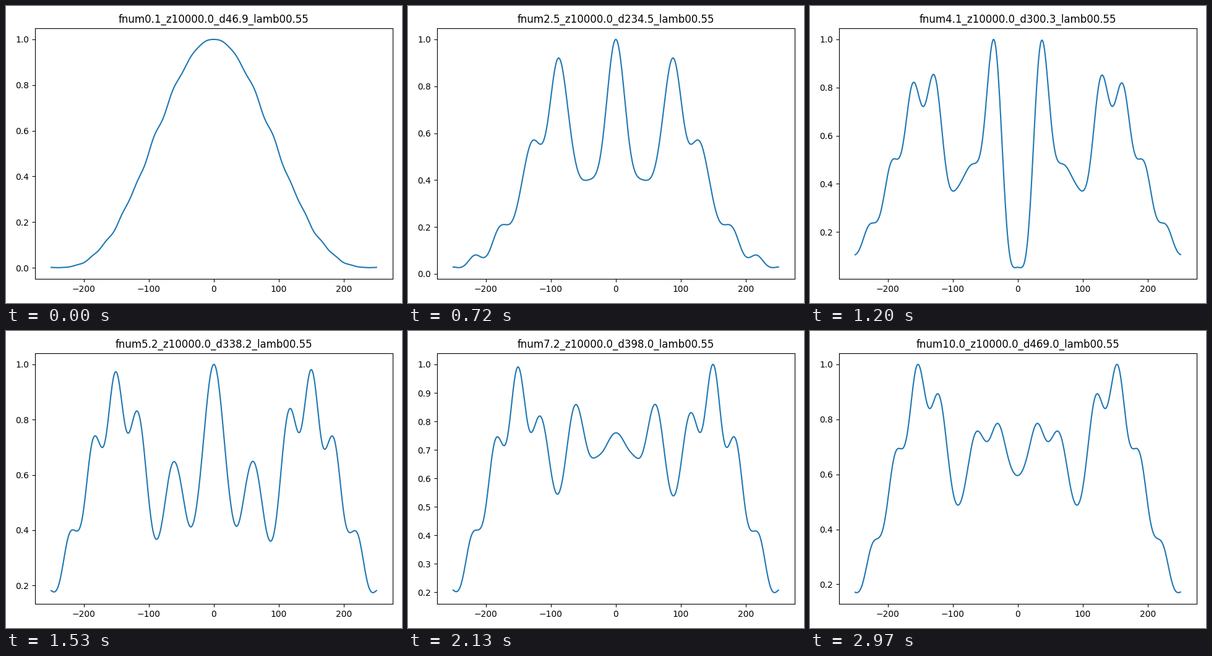
Animation, 640 px wide and 480 px high, one loop 3 s. Source, as a matplotlib script:

```python
import numpy as np
import matplotlib.pyplot as plt
from matplotlib.animation import FuncAnimation

# Diffraction behind a circular aperture, lengths in micrometres
WAVELENGTH = 0.55
DISTANCE = 10000.0
N = 500
PITCH = 0.6
FRAMES = 100
INTERVAL = 30

x_axis = np.arange(N + 1) - N // 2
screen = x_axis * PITCH
grid = screen[:-1]
radius = np.hypot(grid[:, None], grid[None, :])

# Band-limited angular spectrum on a grid padded to twice its width
step = 1 / (2 * N * PITCH)
limit = 1 / (WAVELENGTH * np.hypot(2 * step * DISTANCE, 1))
k_max = int(limit / step)
freq = np.arange(-k_max, k_max + 1) * step
forward = np.exp(-2j * np.pi * np.outer(freq, grid))
backward = np.exp(2j * np.pi * np.outer(screen, freq))
axial = np.sqrt(WAVELENGTH ** -2 - freq[:, None] ** 2 - freq[None, :] ** 2)
transfer = np.exp(2j * np.pi * DISTANCE * (axial - 1 / WAVELENGTH))


def profile(diameter):
    """Normalised intensity along the central row."""
    mask = (radius <= diameter / 2).astype(float)
    spectrum = forward @ mask @ forward.T
    row = backward @ (transfer * spectrum).sum(axis=0)
    intensity = np.abs(row) ** 2
    return intensity / intensity.max()


fig, ax = plt.subplots(figsize=(6.4, 4.8), dpi=100)


def draw(i):
    fnum = (i + 1) / 10
    diameter = 2 * np.sqrt(fnum * WAVELENGTH * DISTANCE)
    ax.clear()
    ax.plot(x_axis, profile(diameter))
    ax.set_title(f"fnum{fnum:.1f}_z{DISTANCE}_d{diameter:.1f}_lamb0{WAVELENGTH}")


draw(0)
fig.tight_layout()
fig.subplots_adjust(top=0.926)
anim = FuncAnimation(fig, draw, frames=FRAMES, interval=INTERVAL,
                     repeat=True, repeat_delay=0)
plt.show()
```
